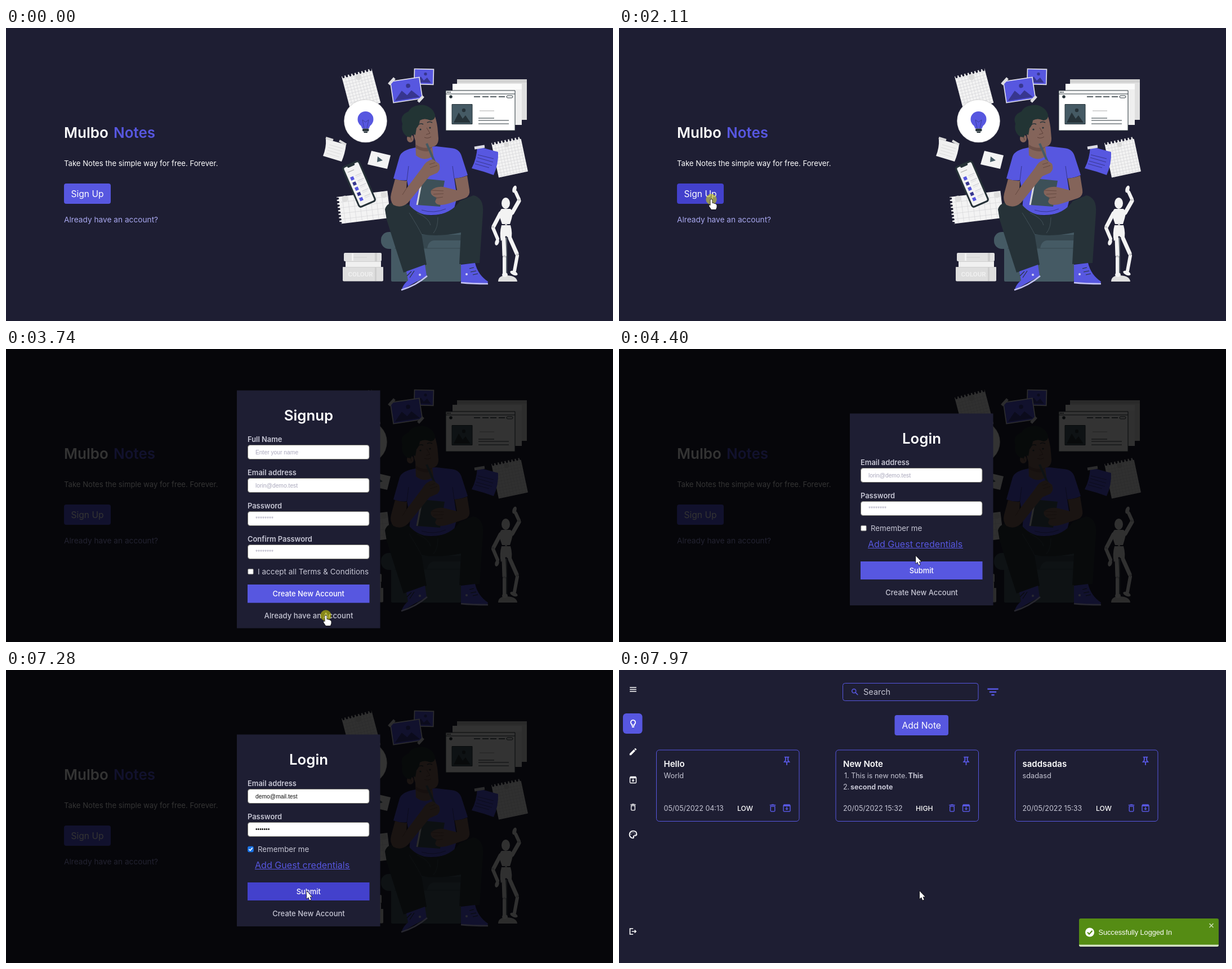
Recreate the animation shown at these times as an HTML page with a canvas. Size 1078 px wide and 520 px high, loop 8 s.

```html
<!DOCTYPE html>
<html lang="en">
<head>
<meta charset="utf-8">
<title>Notes app</title>
<style>
html, body { margin: 0; width: 100%; height: 100%; overflow: hidden; background: #1e1e33; }
canvas { display: block; width: 1078px; height: 520px; }
</style>
</head>
<body>
<canvas id="stage" width="1078" height="520"></canvas>
<script>
const ctx = document.getElementById('stage').getContext('2d');
const LOOP = 8000, STEP = 70;
const BG = '#1e1e33', PURPLE = '#5757e0', HOVER = '#4341cc', DEEP = '#37368f';
const DARK = '#263238', TEAL = '#455a64', SKIN = '#84645a', PALE = '#f3f3f3', SOFT = '#c6c6d4';
const UI = 'Inter, sans-serif', ARIAL = '"Liberation Sans", Arial, sans-serif';

// Basic drawing helpers
function fill(color, d, rule) {
  ctx.fillStyle = color;
  ctx.fill(new Path2D(d), rule || 'nonzero');
}
function line(color, width, d) {
  ctx.strokeStyle = color;
  ctx.lineWidth = width;
  ctx.stroke(new Path2D(d));
}
function box(color, x, y, w, h, r = 0, border, weight = 1) {
  ctx.beginPath();
  ctx.roundRect(x, y, w, h, r);
  if (color) { ctx.fillStyle = color; ctx.fill(); }
  if (border) { ctx.strokeStyle = border; ctx.lineWidth = weight; ctx.stroke(); }
}
function oval(color, x, y, rx, ry = rx, turn = 0) {
  ctx.beginPath();
  ctx.ellipse(x, y, rx, ry, turn, 0, 7);
  ctx.fillStyle = color;
  ctx.fill();
}
function text(str, x, y, size, color, weight = 400, align = 'left', family = UI) {
  ctx.font = `${weight} ${size}px ${family}`;
  ctx.textAlign = align;
  ctx.fillStyle = color;
  ctx.fillText(str, x, y);
}
function at(x, y, degrees, draw) {
  ctx.save();
  ctx.translate(x, y);
  ctx.rotate(degrees * Math.PI / 180);
  draw();
  ctx.restore();
}
function icon(d, x, y, size, color, solid) {
  ctx.save();
  ctx.translate(x - size / 2, y - size / 2);
  ctx.scale(size / 24, size / 24);
  if (solid) fill(color, d, 'evenodd'); else line(color, 2.7, d);
  ctx.restore();
}

const ICONS = {
  menu: 'M2 6h20M2 12h20M2 18h20',
  bulb: 'M9 17v-2.6a6.2 6.2 0 1 1 6 0V17zM9 21h6',
  pencil: 'M3 17.2V21h3.8L17.8 9.9 14 6.2zM20.7 7a1 1 0 0 0 0-1.4l-2.3-2.3a1 1 0 0 0-1.4 0l-1.9 1.8 3.8 3.8z',
  archive: 'M5 3h14l2 3v13l-2 2H5l-2-2V6zM5 8v11h14V8zM11 9h2v4h3l-4 4-4-4h3z',
  trash: 'M6 7h12v12l-2 2H8l-2-2zM8 9v10h8V9zM5 4h3.5l1-1h5l1 1H19v2H5z',
  palette: 'M12 3a9 9 0 0 0 0 18q2.5-1 1-3-.5-3 3-3 5 0 5-4 0-8-9-8zM7 11v1M10 7v1M14 7v1M17 11v1',
  exit: 'M13 4H4v16h9M9 12h12M17 8l4 4-4 4',
  search: 'M3 9a6 6 0 1 0 12 0a6 6 0 1 0-12 0M14 14l7 7',
  filter: 'M1 6h22M5 12h14M9 18h6',
  pin: 'M6 3h12M9 3v8l-3 4h12l-3-4V3M12 15v8'
};

// Illustration
function gridPaper(x, y, w, h, degrees, gap, teethLeft) {
  at(x, y, degrees, () => {
    box(PALE, 0, 0, w, h);
    let grid = '';
    for (let i = gap; i < w; i += gap) grid += `M${i} 0V${h}`;
    for (let j = gap; j < h; j += gap) grid += `M0 ${j}H${w}`;
    line('#d6d6d9', .7, grid);
    const length = teethLeft ? h : w;
    for (let k = 3; k < length; k += 6.2) teethLeft ? oval(BG, 1, k, 3, 2) : oval(BG, k, 1, 2, 3);
  });
}

function photo(x, y, w, h, degrees) {
  at(x, y, degrees, () => {
    box(PURPLE, 0, 0, w, h, 0, '#e4e4ee', 1.6);
    fill(DEEP, `M3 ${h - 3}L${w * .34} ${h * .5} ${w * .5} ${h * .75} ${w * .67} ${h * .55} ${w - 4} ${h - 3}z`);
    oval(DEEP, w * .58, h * .32, h * .1);
  });
}

function browser() {
  box('#e0e0e0', 801, 91, 124, 72);
  box('#d2d2d2', 801, 91, 124, 6);
  box('#efefef', 793, 99, 123, 73);
  box('#fbfbfb', 793, 99, 123, 10);
  box('#fff', 781, 111, 123, 71, 0, DARK);
  line(DARK, 1, 'M781 117H904M839 160H867M839 164H893M839 170H893');
  line(DARK, 2, 'M783 114h1.5m1 0h1.5m1 0h1.5');
  line(DARK, 1.6, 'M831 122h11m4 0h11m3 0h11m4 0h11');
  line('#999', .8, 'M841 147H867');
  oval(DARK, 790, 122, 2.8);
  box(null, 889, 120, 11, 4, 2, DARK);
  box(TEAL, 792, 135.5, 36, 35, 0, DARK);
  fill(DARK, 'M795 168L804 150 811 161 816 155 825 168z');
  oval(DARK, 813, 146, 3.2);
}

function papers() {
  gridPaper(596, 86, 55, 63, -14.8, 5.5);
  oval('#dcdcdc', 626, 87, 5.5);
  oval('#ccc', 638.5, 165, 38.3);
  oval('#fff', 638.5, 165, 37.6);
  oval(PURPLE, 638.5, 162, 14);
  fill(PURPLE, 'M629 170H648L644.5 178.5H632.5z');
  line(DEEP, .8, 'M636 178L633 163 638.5 167 644 163 641 178');
  box(DARK, 633, 178.5, 11.5, 5, 2);
  box(DARK, 635.5, 184, 6.5, 2);

  photo(725.5, 72.5, 34, 27, 1.5);
  photo(682.5, 95, 52, 38, -8.5);
  line('#dedee0', 5, 'M680 100L690 89M732 131L741 121');
  browser();

  fill('#f0f0f0', 'M568 197L604 207Q602 223 596 237L563 227Q569 212 568 197z');
  line('#dcdcdc', 1, 'M574 207L598 214M572 212L597 219M571 217L595 224M569 222L592 229');
  line('#dadada', 4, 'M568 195L581 199M592 200L604 207');
  fill(PALE, 'M649 218L683 226 677 250 642 242z');
  fill(TEAL, 'M660 228L669 235 659 238z');

  gridPaper(587, 300, 91, 48, -6.9, 10, true);
  oval('#dedede', 602, 303, 5.5);
  oval('#dedede', 671, 296, 5.5);
  at(627, 277, -23.4, () => {
    box(DARK, -17, -40, 34, 80, 5);
    box(PALE, -14, -37, 28, 74, 3);
    box(DARK, -7, -38, 14, 4, 2);
    line('#aaa', 1, 'M-10-27H2');
    for (let i = 0; i < 5; i++) {
      const y = -17 + i * 10;
      box(i % 2 ? DEEP : PURPLE, -10, y, 6, 6);
      box('#d5d5da', 0, y, 12, 1.5);
      box('#dfdfe3', 0, y + 3, 9, 1.2);
    }
  });

  gridPaper(862, 204, 53, 63, -12, 5.5);
  oval('#dadada', 889, 207, 4.5);
  fill(PURPLE, 'M837 210L874 220Q875 241 866 261 847 254 827 249 836 232 837 210z');
  line(DEEP, 1, 'M838 225L866 232M837 230L865 238M835 236L863 244M833 241L858 248');
  line('#dcdce4', 5, 'M832 213L850 210');
}

function mannequin() {
  ctx.lineCap = 'round';
  line('#9aa', 1, 'M889 372V442');
  line(PALE, 7, 'M899 328L911 307M878 329L866 352M884 374L885 403M895 373L907 400');
  line(PALE, 6, 'M911 304L905 291M865 355L873 374M885 408V435M908 404L903 431');
  ctx.lineCap = 'butt';
  fill(PALE, 'M880 321L896 321Q902 326 898 338L895 348H881L877 336Q875 325 880 321zM880 350H896Q900 364 897 376L888 369 879 378Q876 364 880 350z');
  oval(PALE, 887.5, 311, 7.5, 10);
  oval(PALE, 903, 286, 3.5, 6.5, .3);
  oval(PALE, 872, 380, 3.5, 6, .3);
  oval(PALE, 902, 435, 7, 3.5, .4);
  for (const [x, y] of [[911, 305], [865, 353], [885, 405], [908, 402], [888, 349]]) oval('#c9c9cc', x, y, 2);
  fill('#dedede', 'M874 450Q874 439 890 439 907 440 908 450z');
  oval(PALE, 886, 438, 5, 4);
}

function books() {
  box('#e1e1e1', 600, 399, 67, 15, 2);
  box('#f0f0f0', 603, 414, 63, 10);
  box('#dedede', 598, 424, 72, 25.5, 2);
  box('#f2f2f2', 614, 400, 3, 13);
  box('#cecece', 655, 399, 4, 15);
  box('#cecece', 655, 424, 3, 25);
  line('#cfcfcf', 1, 'M617 407H641M598 424.5H670M603 414.5H666');
  text('COLOUR', 629.5, 441, 11.5, '#f0f0f0', 700, 'center', 'Roboto, sans-serif');
}

function person() {
  box(TEAL, 666, 362, 166, 30, 14);
  box(TEAL, 684, 378, 124, 72, 2);
  line('#36474f', 1, 'M690 391H808');
  fill('#36474f', 'M738 367H808V377H760Q750 378 748 391L738 390z');

  // Shirt and trousers
  fill(PURPLE, 'M728 212Q703 216 699 228L688 267Q700 272 712 270L718 300 716 322Q750 341 795 324L801 300 796 267Q810 266 820 261L809 227Q805 214 790 213L764 210z');
  line(DEEP, 1, 'M712 270L715 245M796 267L793 245M738 323Q760 330 781 321');
  fill(DARK, 'M673 322Q676 309 695 309L716 314Q731 332 757 333 791 330 806 307L830 297Q849 301 847 328L841 417 805 419 808 363Q770 371 738 366L747 420 706 434Q690 385 676 340z');
  line('#415057', 1, 'M716 328Q733 355 738 366M767 336Q767 355 759 364M730 328Q752 338 754 350');

  // Shoes
  fill(PURPLE, 'M711 432L744 420 747 440 703 465Q704 456 714 448zM808 420L833 417Q838 438 856 450L855 454 808 452z');
  line('#c4c3f2', 2.6, 'M702 465Q728 457 748 440M808 452Q828 454 856 454');
  line(DARK, 1.2, 'M712 440l8-8M717 443l8-12M823 427l8-2M825 433l10-2M829 438l9-2');
  oval('#d5d5f4', 735, 438, 2);
  oval('#d5d5f4', 818, 437, 2);

  // Head
  fill(SKIN, 'M724 172Q722 188 727 200L728 226Q744 239 759 226L757 211Q768 209 768 196L767 184Q766 169 762 157 745 150 728 165z');
  fill('#6e5149', 'M728 207Q741 216 757 211L749 219Q737 219 728 213z');
  oval(SKIN, 718, 196, 6, 7);
  fill('#223434', 'M709 190Q701 182 704 170 698 155 715 148 720 137 740 136.5 757 139 762 154 763 163 754 164 743 159 735 164 734 173 729 178L727 190Q721 186 719 194 713 194 709 190z');
  line(DARK, 1.6, 'M732 172Q736 168 741 171M748 168Q752 165 757 168');
  line('#5c4039', 1, 'M747 177L753 187 746 189M743 194Q749 197 755 193M716 193Q720 194 720 199');
  oval(DARK, 736, 180, 1.6);
  oval(DARK, 753, 177, 1.6);

  // Notebook, arms and pen
  fill('#3d5058', 'M738 267L779 271 771 317 729 314z');
  line('#d8d8de', 3, 'M739 267L730 314');
  line(TEAL, 4, 'M747 205L764 244');
  fill(SKIN, 'M691 268Q702 272 712 271L711 285 739 248Q746 235 758 233L769 241Q773 250 766 257L752 263 714 310Q702 321 688 314 681 306 684 294z');
  fill(SKIN, 'M797 267Q810 266 819 262L823 287Q825 298 815 302L788 311Q765 318 762 308L765 301Q752 297 755 288 766 279 781 283L801 288z');
  line('#654940', 1, 'M711 285L704 296M752 242L762 239M753 248L766 244M755 288L777 289M759 295L777 294M763 302L776 300');
}

// Screens
let pointer = null;
function button(label, x, y, w, h, size, weight, r) {
  const over = pointer && pointer.x > x && pointer.x < x + w && pointer.y > y && pointer.y < y + h;
  box(over ? HOVER : PURPLE, x, y, w, h, r);
  text(label, x + w / 2, y + h / 2 + size * .36, size, '#fff', weight, 'center');
}

function landing() {
  text('Mulbo', 103, 195, 26, '#fff', 600);
  text('Notes', 191, 195, 26, PURPLE, 600);
  text('Take Notes the simple way for free. Forever.', 103, 245, 13.15, '#fff');
  button('Sign Up', 103, 276, 83, 36, 15.6, 400, 4);
  text('Already have an account?', 103, 345, 13.7, '#a9a8f0');
  papers();
  books();
  mannequin();
  person();
}

function field(label, y, value, color, drop = 17) {
  text(label, 429, y - 5.5, 12.9, SOFT, 600);
  box('#fff', 429.5, y + .5, 215.5, 25, 4, '#77776f');
  text(value, 443, y + drop, 10.3, color, 400, 'left', ARIAL);
}
function checkbox(label, y, checked, size) {
  box(checked ? '#1a75e8' : '#fff', 429.7, y + .3, 9.5, 9.5, 1.5, checked ? '#1a75e8' : '#777');
  if (checked) line('#fff', 1.6, `M431.5 ${y + 5}l2.2 2.3 4-4.7`);
  text(label, 447, y + 9.7, size, SOFT);
}
function dialog(title, y, h) {
  box('rgba(0,0,0,.8)', 0, 0, 1078, 520);
  box(BG, 410, y, 254.5, h);
  text(title, 537.5, y + 53.5, 25.8, '#fff', 600, 'center');
}
const HINT = '#aaa8bc';

function signup() {
  dialog('Signup', 73.5, 422);
  field('Full Name', 170, 'Enter your name', HINT);
  field('Email address', 229, 'lorin@demo.test', HINT);
  field('Password', 288, '********', HINT);
  field('Confirm Password', 347, '********', HINT);
  checkbox('I accept all Terms & Conditions', 390, false, 13.5);
  button('Create New Account', 429, 418, 216.5, 32.5, 12.9, 500);
  text('Already have an Account', 537.5, 478, 13.2, SOFT, 500, 'center');
}

function login(filled, checked) {
  dialog('Login', 114.5, 340.5);
  const ink = filled ? '#111' : HINT;
  field('Email address', 211, filled ? 'demo@mail.test' : 'lorin@demo.test', ink);
  field('Password', 270, filled ? '•••••••' : '********', ink, filled ? 16 : 17);
  checkbox('Remember me', 313, checked, 13.3);
  text('Add Guest credentials', 442, 351.5, 16.1, PURPLE);
  box(PURPLE, 442, 353, 169, 1);
  button('Submit', 429, 377, 216.5, 32, 12.9, 500);
  text('Create New Account', 537.5, 437, 13, SOFT, 500, 'center');
}

function card(x, title, date, level, levelX) {
  box(null, x + .5, 142, 253.5, 126.5, 5, PURPLE);
  text(title, x + 13.5, 172, 15, '#fff', 600);
  text(date, x + 13.5, 249.5, 12.5, SOFT);
  text(level, x + levelX, 249.5, 12.2, '#fff', 500);
  icon(ICONS.pin, x + 232, 161, 17, PURPLE);
  icon(ICONS.trash, x + 207, 245, 18, PURPLE, true);
  icon(ICONS.archive, x + 232, 245, 18, PURPLE, true);
}

function notes() {
  box(PURPLE, 7, 77, 34.5, 36, 6);
  icon(ICONS.menu, 25, 34.5, 14, '#fff');
  icon(ICONS.bulb, 25, 95, 16, '#fff');
  icon(ICONS.pencil, 25, 145, 16.5, '#fff', true);
  icon(ICONS.archive, 25, 195, 16.5, '#fff', true);
  icon(ICONS.trash, 25, 243.5, 16, '#fff', true);
  icon(ICONS.palette, 25, 292, 17, '#fff');
  icon(ICONS.exit, 24.5, 464, 15, '#fff');

  box(null, 397.5, 23.5, 240.5, 31, 4, PURPLE);
  icon(ICONS.search, 419, 39, 14, PURPLE);
  text('Search', 434, 43.7, 14.5, SOFT);
  icon(ICONS.filter, 664, 39, 21, PURPLE);
  button('Add Note', 489.5, 80, 95.5, 36, 15.6, 400, 4);

  card(66, 'Hello', '05/05/2022 04:13', 'LOW', 144);
  text('World', 79.5, 192, 12.8, SOFT);
  card(384.5, 'New Note', '20/05/2022 15:32', 'HIGH', 142.5);
  text('1. This is new note.', 400, 192, 12.5, SOFT);
  text('This', 513.5, 192, 12.6, SOFT, 700);
  text('2.', 398, 212, 12.5, SOFT);
  text('second note', 411, 212, 12.5, SOFT, 700);
  card(703, 'saddsadas', '20/05/2022 15:33', 'LOW', 144);
  text('sdadasd', 716.5, 192, 12.8, SOFT);
}

const BOUNCE = [150, -19, -6, 8, -4, 0];
function toast(t) {
  const i = Math.floor((t - 7620) / STEP);
  if (i < 0) return;
  ctx.save();
  ctx.translate(BOUNCE[Math.min(i, 5)], 0);
  box('#558c14', 817, 441, 248, 50, 3);
  box('#d3e2c2', 817, 487.5, 248, 3.5, [0, 0, 3, 3]);
  oval('#fff', 836, 465.5, 8);
  line('#558c14', 2, 'M832 465.5l3 3.2 5.5-6');
  text('Successfully Logged In', 851.5, 470, 12.7, '#fff', 400, 'left', ARIAL);
  line('#c9dcb4', 1.6, 'M1048.5 450l7 7m0-7l-7 7');
  ctx.restore();
}

// Pointer: start time, number of steps, destination
const START = { x: 1060, y: 528 };
const MOVES = [
  [260, 4, 542, 428], [730, 6, 168, 300], [1350, 3, 189, 320], [1560, 4, 164, 304],
  [2560, 12, 568, 473], [4060, 8, 520.5, 350], [5150, 6, 470, 310.5], [6010, 7, 534, 392.5]
];
const CLICKS = [[2110, 2230], [3740, 3870], [4990, 5150], [5870, 6010], [6810, 6890]];
const HAND = [[1080, 1420], [1700, 2560], [3390, 4060], [4550, 5150], [5470, 6080]];
const during = (ranges, t) => ranges.some(([a, b]) => t >= a && t < b);

function pointerAt(t) {
  if (t < 260) return null;
  let { x, y } = START;
  for (const [start, steps, toX, toY] of MOVES) {
    if (t < start) break;
    const p = Math.min(1, (Math.floor((t - start) / STEP) + 1) / steps);
    const e = p * (2 - p);
    x += (toX - x) * e;
    y += (toY - y) * e;
  }
  return { x, y };
}

function drawPointer(t) {
  if (!pointer) return;
  if (during(CLICKS, t)) oval('rgba(205,205,10,.6)', pointer.x, pointer.y, 9.7);
  ctx.save();
  ctx.translate(pointer.x, pointer.y);
  ctx.lineJoin = 'round';
  const shape = during(HAND, t)
    ? 'M-1.5 1Q0-1 1.5 1V7Q4 6 5 8 7 7 8 9 9.5 9 9.5 11V14L8 18H0L-4 12Q-4 9-1.5 11z'
    : 'M0 0V13.5L3 10.7 5.2 16 7.7 15 5.5 9.9H9.5z';
  line('#111', 1.4, shape);
  fill('#fff', shape);
  ctx.restore();
}

function render(t) {
  pointer = pointerAt(t);
  box(BG, 0, 0, 1078, 520);
  if (t < 7410) {
    landing();
    if (t >= 3870) login(t >= 5150, t >= 6010);
    else if (t >= 2230) signup();
  } else {
    notes();
    toast(t);
  }
  drawPointer(t);
}

const began = performance.now();
function frame() {
  render((performance.now() - began) % LOOP);
  requestAnimationFrame(frame);
}
frame();
</script>
</body>
</html>
```
